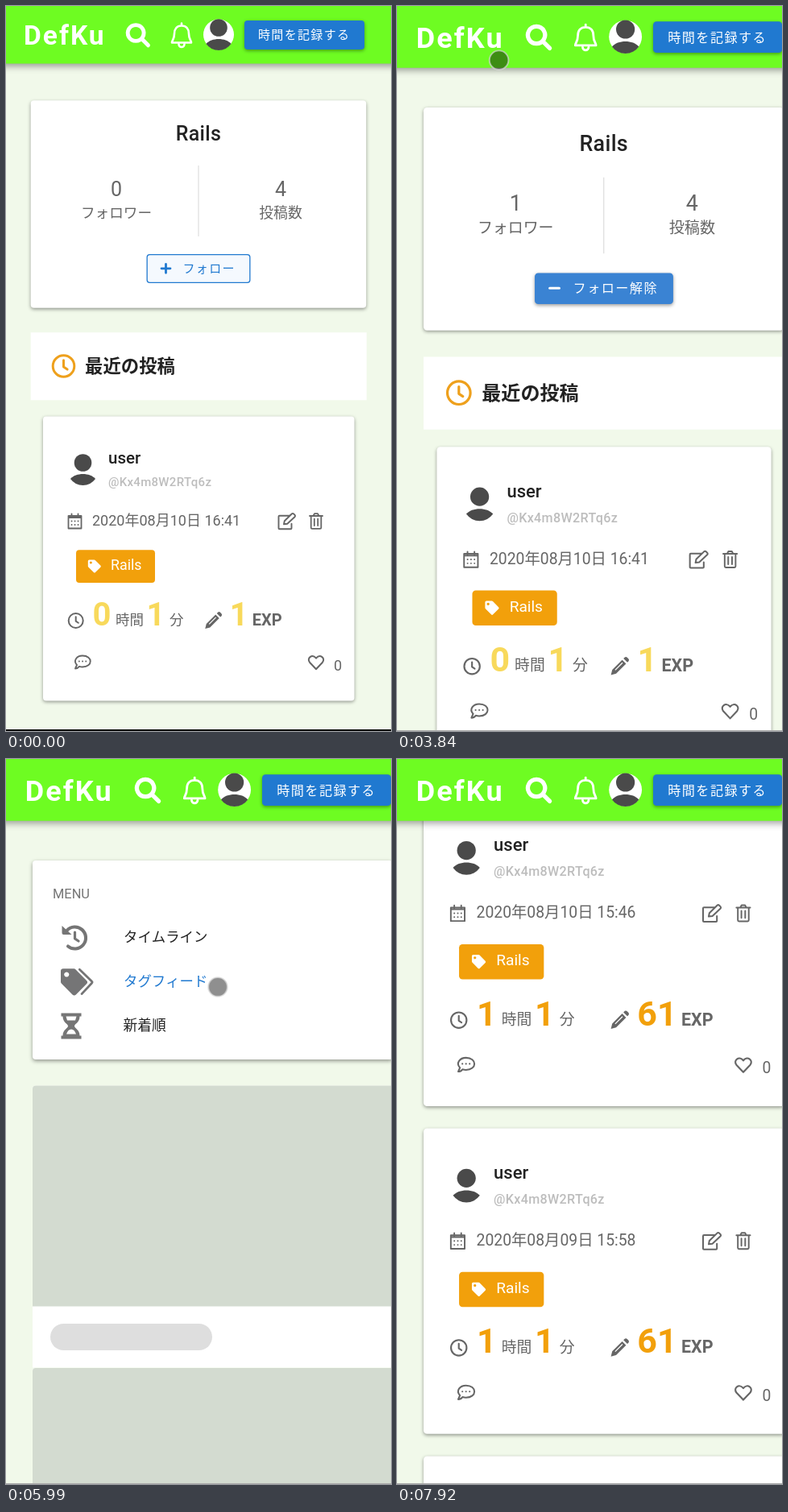
These frames come from a looping animation (478x900 px, 8000 ms). An HTML page with a canvas:

```html
<!DOCTYPE html>
<html lang="ja">
<head>
<meta charset="utf-8">
<style>
html, body { margin: 0; width: 100%; height: 100%; overflow: hidden; background: #000 }
canvas { display: block }
</style>
</head>
<body>
<canvas id="stage" width="478" height="900"></canvas>
<script>
const ctx = document.getElementById('stage').getContext('2d');
const LOOP = 8000, ZOOM = 1.0743;
const BLUE = '#2079d0', ORANGE = '#f2a00b', YELLOW = '#f8d95b', GREY = '#666', INK = '#222';

const ICONS = {
  search: 'M-2.8-12.2a9.9 9.9 0 1 1-.1 0zM4.5 5L12.5 13',
  bell: 'M0-12c-6 0-9 4-9 10 0 7-3 8-3 11h24c0-3-3-4-3-11 0-6-3-10-9-10zM0-15v3M-3.500 11a3.500 3.500 0 0 0 7 0',
  body: 'M-15.500 11.500C-9 3.500 9 3.500 15.500 11.500A19 19 0 0 1-15.500 11.500z',
  plus: 'M-5.500 0h11M0-5.500v11',
  minus: 'M-5.500 0h11',
  hands: 'M0-7V1l4.500 3',
  calendar: 'M-8-6.5h16V9H-8zM-8-4.5h16M-4-9v3M4-9v3M-4 0h.1M0 0h.1M4 0h.1M-4 4.5h.1M0 4.5h.1M4 4.5h.1',
  edit: 'M3-7H-9.5q-1 0-1 1V8.5q0 1 1 1H4.5q1 0 1-1V3M-4 3.5l.8-4L6-9.5q1-.8 2 0l1.7 1.7q.8 1 0 2L.3 3z',
  trash: 'M-8-6.5H8M-6.3-6.5V8q0 1.3 1.3 1.3h10q1.3 0 1.3-1.3V-6.5M-3.5-6.5L-2-9.3h4l1.500 2.8M-2.2-2.8V5.5M2.2-2.8V5.5',
  pencil: 'M-10 10l1.500-6L3-7.500 7.500-3-4 8.500zM4.500-9l1.500-1.500q1.500-1 3 .5l1 1q1.500 1.500.5 3L9-4.500zM-5.500 4L3-4.500l.8.8L-4.7 4.8z',
  comment: 'M-9 8l2-4.500C-12-2-7-8 0-8 13-8 13 6 0 6q-2 0-4-.6Q-6 8-9 8zM-4.200-1h.1M0-1h.1M4.200-1h.1',
  heart: 'M0 8.500L-8 0C-12-5-5-11 0-5 5-11 12-5 8 0z',
  rewind: 'M-10-9A13.500 13.500 0 1 1-8.500 10.500',
  arrow: 'M-16-15L-4-4H-14q-2 0-2-2z',
  tag: 'M-21-13.4q0-3.1 3.1-3.1H-4.7q1.2 0 2.1.9L11-1.9q2.2 2.2 0 4.4L-2.1 15.6q-2.2 2.2-4.4 0L-20.1 1.9q-.9-.9-.9-2.1zM-13.8-12.4a3.1 3.1 0 1 0 .1 0z',
  tagEdge: 'M2.3-15.6L17.5-.8q1.2 1.1 0 2.2L5 14.8',
  hourglass: 'M-12.500-16h25v4h-2C10.500-4 4-3 4 0S10.500 4 10.500 12h2v4h-25v-4h2C-10.500 4-4 3-4 0S-10.500-4-10.500-12h-2zM-6.500-12H6.500L5-7H-5zM-6 10H6Q4 4 0 4T-6 10z'
};
for (const name in ICONS) ICONS[name] = new Path2D(ICONS[name]);

const clamp = v => Math.min(1, Math.max(0, v));
const span = (t, from, to) => clamp((t - from) / (to - from));
const mix = (a, b, p) => a + (b - a) * p;
const easeOut = (p, power) => 1 - (1 - p) ** power;
const easeInOut = p => p < .5 ? 4 * p ** 3 : 1 - 4 * (1 - p) ** 3;

function at(x, y, scale, draw) {
  ctx.save();
  ctx.translate(x, y);
  ctx.scale(scale, scale);
  draw();
  ctx.restore();
}

function box(x, y, w, h, radius, fill, shadow = 0) {
  ctx.save();
  if (shadow) {
    ctx.shadowColor = 'rgba(0,0,0,.4)';
    ctx.shadowBlur = shadow;
    ctx.shadowOffsetY = shadow / 2.5;
  }
  ctx.fillStyle = fill;
  ctx.beginPath();
  ctx.roundRect(x, y, w, h, radius);
  ctx.fill();
  ctx.restore();
}

function disc(x, y, r, fill) {
  ctx.fillStyle = fill;
  ctx.beginPath();
  ctx.arc(x, y, r, 0, 7);
  ctx.fill();
}

// Stroked when a line width is given, otherwise filled.
function icon(name, x, y, color, line = 0, scale = 1) {
  at(x, y, scale, () => {
    ctx.fillStyle = ctx.strokeStyle = color;
    ctx.lineWidth = line;
    ctx.lineJoin = ctx.lineCap = 'round';
    if (line) ctx.stroke(ICONS[name]);
    else ctx.fill(ICONS[name], 'evenodd');
  });
}

// y is the middle of the glyphs.
function text(str, x, y, size, color, { weight = 400, align = 'left', spacing = 0 } = {}) {
  ctx.font = `${weight} ${size}px Roboto, "Noto Sans CJK JP", sans-serif`;
  ctx.letterSpacing = spacing + 'px';
  ctx.textAlign = align;
  ctx.fillStyle = color;
  ctx.fillText(str, x, y + size * .365);
  return ctx.measureText(str).width;
}

function clock(x, y, r, color, line) {
  ctx.strokeStyle = color;
  ctx.lineWidth = line;
  ctx.beginPath();
  ctx.arc(x, y, r, 0, 7);
  ctx.stroke();
  icon('hands', x, y, color, line * 13 / r, r / 13);
}

function avatar(x, y) {
  disc(x, y - 8.5, 10.8, '#4a4a4a');
  icon('body', x, y, '#4a4a4a');
}

function header() {
  box(-10, -20, 500, 91.5, 0, '#6efc22', 9);
  text('DefKu', 22, 36, 33.5, '#fff', { weight: 700, spacing: 2 });
  icon('search', 164, 35.8, '#fff', 4.9);
  icon('bell', 218, 36.5, '#fff', 2.6);
  disc(264, 35.5, 19, '#fff');
  avatar(264, 35.5);
  box(296, 18, 149, 36, 4, BLUE, 4);
  text('時間を記録する', 313, 36, 15, '#fff', { spacing: 1.34 });
}

function post(x, y, w, [date, hours, exp]) {
  at(x, y, 1, () => {
    const accent = hours ? ORANGE : YELLOW, big = { weight: 700 };
    box(0, 0, w, 353, 4, '#fff', 4);
    avatar(49.5, 66);
    text('user', 81, 50.7, 20.5, INK, { weight: 500 });
    text('@Kx4m8W2RTq6z', 81, 81.5, 15, '#bdbdbd', { weight: 500, spacing: .3 });
    icon('calendar', 39.5, 130, GREY, 1.8);
    text(date, 61, 129, 18, GREY);
    icon('edit', w - 83.5, 130.3, GREY, 1.9);
    icon('trash', w - 47.5, 130, GREY, 1.8);
    box(41, 165.8, 98, 40.6, 4, ORANGE);
    icon('tag', 66, 186, '#fff', 0, .485);
    text('Rails', 84, 184, 17.8, '#fff');
    clock(40.7, 253.5, 9, GREY, 2);
    text(hours, 61.5, 245, 40, accent, big);
    text('時間', 90, 252.5, 17.5, GREY);
    text('1', 128.5, 245, 40, accent, big);
    text('分', 157, 252.5, 17.5, GREY);
    icon('pencil', w / 2 + 18, 253.5, GREY);
    const expWidth = text(exp, w / 2 + 38.5, 245, 40, accent, big);
    text('EXP', w / 2 + 43.5 + expWidth, 252.2, 20, GREY, big);
    icon('comment', 49, 305, GREY, 1.9);
    icon('heart', w - 47.5, 305.2, GREY, 2);
    text('0', w - 20.5, 308.5, 18, GREY, { align: 'center' });
  });
}

const POSTS = [
  ['2020年08月10日 16:41', 0, 1],
  ['2020年08月10日 15:46', 1, 61],
  ['2020年08月09日 15:58', 1, 61],
  ['2020年08月09日 15:41', 1, 61]
];

function profile(followed) {
  const mid = { align: 'center' };
  box(30.7, 117.3, 416.5, 257.5, 4, '#fff', 4);
  text('Rails', 239, 158, 25, INK, { weight: 500, align: 'center', spacing: .3 });
  text(followed ? 1 : 0, 137, 227, 25, GREY, mid);
  text('フォロワー', 137, 256.3, 17.6, GREY, mid);
  text('4', 341, 227, 25, GREY, mid);
  text('投稿数', 341, 256.3, 17.8, GREY, mid);
  box(238.5, 198, 1, 88, 0, '#d8d8d8');
  if (followed) {
    box(159.2, 308.5, 160, 36, 4, '#3a83d3', 4);
    icon('minus', 182, 326, '#fff', 2.8);
    text('フォロー解除', 203.5, 325.5, 15, '#fff', { spacing: 1.34 });
  } else {
    box(174.5, 308, 129, 36, 4, BLUE);
    box(175.8, 309.3, 126.4, 33.4, 3, '#f5f9fe');
    icon('plus', 198.5, 325.8, BLUE, 2.8);
    text('フォロー', 219.5, 325.5, 15, BLUE, { spacing: 1.34 });
  }
  box(30.7, 405.3, 417, 84, 0, '#fff');
  clock(71.5, 447, 13.3, '#eea01c', 3);
  text('最近の投稿', 98, 447, 22.4, INK, { weight: 700 });
  post(46, 509.5, 386.5, POSTS[0]);
}

function feed(t) {
  const active = span(t, 5990, 6400);
  box(33, 126, 447, 247, 4, '#fff', 5);
  ctx.globalAlpha = active;
  box(47, 249.5, 420, 55, 0, '#e7f0fa');
  ctx.globalAlpha = 1;
  text('MENU', 58, 167, 16.4, '#757575');
  icon('rewind', 85.5, 222, '#757575', 4.1);
  icon('arrow', 85.5, 222, '#757575');
  icon('hands', 85.5, 222, '#757575', 3.2);
  for (const [color, alpha] of [['#757575', 1], [BLUE, active]]) {
    ctx.globalAlpha = alpha;
    icon('tag', 89, 276.8, color);
    icon('tagEdge', 89, 276.8, color, 2.8);
  }
  ctx.globalAlpha = 1;
  icon('hourglass', 81, 331.5, '#757575');
  text('タイムライン', 146, 220.5, 17.4, INK);
  text('タグフィード', 146, 275.5, 17.4, t >= 5990 ? BLUE : INK);
  text('新着順', 145.5, 330.5, 17.8, INK);

  if (t < 6740) {
    for (const y of [405.5, 756]) {
      box(33, y, 450, 350, [4, 0, 0, 0], '#fff');
      box(33, y, 450, 274, [4, 0, 0, 0], '#d3dbd0');
    }
    box(55, 701, 201, 33, 16.5, '#dedede');
  } else {
    POSTS.forEach((data, i) =>
      at(33, 419.5 + 406.8 * i, ZOOM, () => post(0, 0, 417, data)));
  }
}

// [start, end, x, y] of each pointer move, in page units
const MOVES = [
  [1600, 1890, 275.5, 326],
  [3420, 4130, 95, 37],
  [5070, 5570, 244.8, 263.4]
];

function pointer(t) {
  if (t < 1600 || t > 7330) return;
  let x = 444, y = 305;
  for (const [from, to, tx, ty] of MOVES) {
    const p = span(t, from, to);
    x = mix(x, tx, easeOut(p, 2.3));
    y = mix(y, ty, easeOut(p, 2.7));
  }
  disc(x, y, 11, 'rgba(0,0,0,.44)');
  ctx.strokeStyle = 'rgba(215,215,215,.7)';
  ctx.lineWidth = 1.8;
  ctx.stroke();
}

function render(now) {
  const t = now % LOOP;
  const zoom = easeInOut(span(t, 2650, 3260));
  const top = t < 140 ? 0 : 30 * (1 - zoom);
  const bottom = t < 140 ? 898 : mix(868, 899, zoom);
  const scale = mix(1, ZOOM, zoom);
  const scroll = 774.5 * easeInOut(span(t, 7170, 7920));

  ctx.fillStyle = '#f1f9ea';
  ctx.fillRect(0, 0, 478, 900);
  if (t < 4580) at(0, top, scale, () => profile(t >= 2710));
  else at(0, -scroll, 1, () => feed(t));
  at(0, top, scale, () => { header(); pointer(t); });

  ctx.fillStyle = '#000';
  ctx.fillRect(0, 0, 478, top);
  ctx.fillStyle = zoom < 1 ? '#000' : '#aaa';
  ctx.fillRect(0, bottom, 478, 900 - bottom);
  requestAnimationFrame(render);
}
requestAnimationFrame(render);
</script>
</body>
</html>
```
